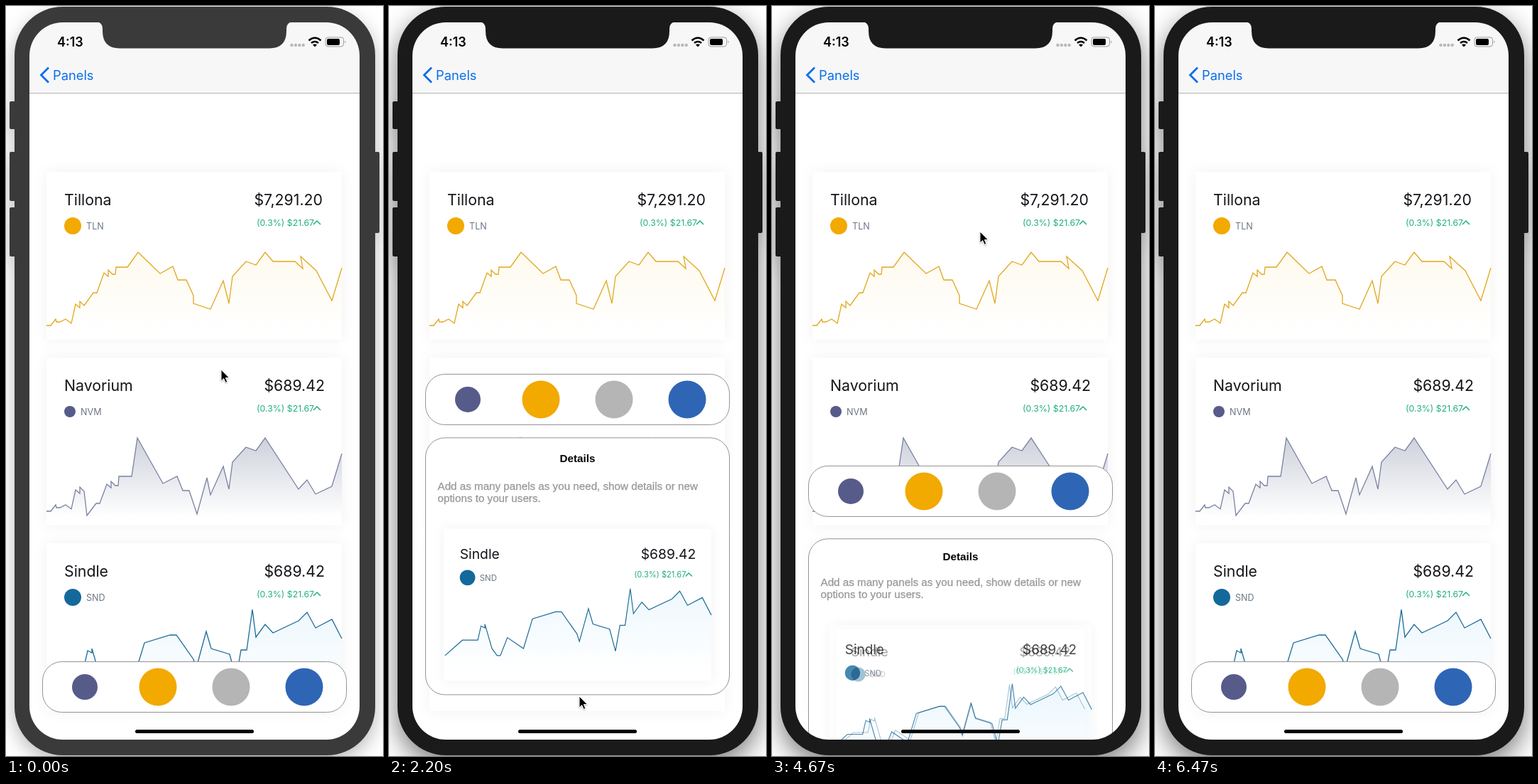
These frames come from a looping animation (531 px wide and 1054 px high, 6540 ms). An HTML page:

```html
<!DOCTYPE html>
<html lang="en">
<head>
<meta charset="utf-8">
<title>Panels</title>
<style>
html, body { margin: 0; width: 100%; height: 100%; overflow: hidden; background: #fff; }
svg { display: block; width: 531px; height: 1054px; }
svg { font-family: Inter, Roboto, sans-serif; }
.big { font-size: 21.3px; fill: #15151a; }
.tick { font-size: 12.6px; fill: #6c7886; }
.gain { font-size: 12.3px; fill: #20b07c; }
.card { fill: #fff; filter: drop-shadow(0 0 9px rgba(0,0,0,.055)); }
.sheet { fill: #fff; stroke: #939393; }
#head, #help { font-family: "Liberation Sans", Arial, sans-serif; font-size: 15.2px; }
#head { font-weight: 700; text-anchor: middle; }
#help { fill: #999; stroke: #999; stroke-width: .3; }
#ghost { mix-blend-mode: multiply; }
#phone { fill: #3a3a3a; filter: drop-shadow(0 9px 13px rgba(0,0,0,.27)); }
#phone.active { fill: #1a1a1a; filter: drop-shadow(0 13px 18px rgba(0,0,0,.52)); }
</style>
</head>
<body>
<svg viewBox="0 0 531 1054">
  <clipPath id="screen"><rect x="33" y="23" width="465" height="1008" rx="47"/></clipPath>
  <g id="phone">
    <rect x="12" y="1" width="508" height="1052" rx="68"/>
    <path d="M7 134h10v39H7q-2 0 -2 -2v-35q0 -2 2 -2zM7 205h10v69H7q-2 0 -2 -2v-65q0 -2 2 -2zM7 283h10v69H7q-2 0 -2 -2v-65q0 -2 2 -2z"/>
    <rect x="514" y="205" width="12" height="114" rx="2"/>
  </g>
  <g clip-path="url(#screen)">
    <path d="M0 0H531V1054H0z" fill="#fff"/>
    <g id="cards"></g>
    <path d="M33 22H498V122H33z" fill="#f7f7f7"/>
    <path d="M33 122.500H498" stroke="#b4b4b4"/>
    <g id="panel">
      <rect class="sheet" x="51.500" y=".5" width="428" height="361" rx="27"/>
      <text id="head" x="265.500" y="35">Details</text>
      <g id="help">
        <text x="68.500" y="74">Add as many panels as you need, show details or new</text>
        <text x="68.500" y="91">options to your users.</text>
      </g>
      <use id="mini" href="#c2"/>
      <use id="ghost" href="#c2"/>
    </g>
    <g id="bar">
      <rect class="sheet" x="51.500" y=".5" width="428" height="71" rx="27"/>
    </g>
    <rect x="182" y="1017" width="167" height="5" rx="2.500"/>
  </g>
  <path id="notch" d="M127 22Q136 23 136 32V35Q136 59.500 160 59.500H371Q395 59.500 395 35V32Q395 23 404 22z"/>
  <text x="72" y="57" font-size="18" font-weight="600">4:13</text>
  <path d="M402.500 55H420" stroke="#b9b9b9" stroke-width="4.400" stroke-linecap="round" stroke-dasharray="0 5.400"/>
  <g fill="none" stroke="#000" stroke-width="2.500">
    <path d="M426.500 48.500Q435 41 443.500 48.500M430 52Q435 48 440 52"/>
    <path d="M432 54.500Q435 52.500 438 54.500L435 57.500z" fill="#000" stroke="none"/>
  </g>
  <rect x="450" y="44" width="25.500" height="13" rx="3.500" fill="none" stroke="#999"/>
  <rect x="452" y="46" width="18" height="9" rx="2"/>
  <path d="M477.500 48.500q2 2 0 4z" fill="#888"/>
  <path d="M60 86.500L49.500 97L60 107.500" fill="none" stroke="#0a6fec" stroke-width="2.800"/>
  <text x="66" y="103.500" font-size="18.300" fill="#0a6fec">Panels</text>
  <path id="cursor" d="M0 0V16L3.700 12.600L6.200 18.300L8.800 17.200L6.400 11.600H11.400z" stroke="#fff" style="filter:drop-shadow(0 1px 1px rgba(0,0,0,.3))"/>
</svg>
<script>
const $ = id => document.getElementById(id);

// Charts are built from a few turning points and these shared pieces.
const jog = 'l6 5v-9l6 6';
const start = '0 216h6l7 -9 1 4h5l8 -4 8 6L41 186' + jog;
const middle = 'L231 193 249 153 257 185 262 147 281 126l14 5L308 113';
const end = 'L402 181 416 135';

const coins = [
  { name: 'Tillona', tick: 'TLN', price: '$7,291.20', right: 389, r: 12, icon: '#f2a900',
    line: '#e0a820', tint: '#f5c542', alpha: .09,
    chart: `${start}L66 170h5L81 142${jog}H97l1 -10h16L129 113 160 143 178 133 185 152h12L207 174v11${middle}l11 13h31l11 10L358 119 380 139${end}` },
  { name: 'Navorium', tick: 'NVM', price: '$689.42', right: 392, r: 8, icon: '#565b8a',
    line: '#7b80a2', tint: '#75809a', alpha: .36,
    chart: `${start}L57 222 70 205h5L85 178${jog}H101l1 -13h18L128 113 164 177 184 167 192 187h9L212 220 226 169${middle}L355 185 367 172 379 192${end}` },
  { name: 'Sindle', tick: 'SND', price: '$689.42', right: 392, r: 12, icon: '#14699b',
    line: '#1d6b97', tint: '#5bbcf0', alpha: .11,
    chart: `2 197L29 173h24L58 151l6 3v-6L75 186l8 11h5L99 169 124 186 138 140 174 129h9L207 163l4 12L225 124l7 24 26 8L267 190 274 150h8L290 93l5 39L308 114l11 12L355 109 367 97 379 119 402 107 416 134` }
];

function card(c, i) {
  const cx = 25 + c.r;
  return `<g transform="translate(57 ${233 + 261 * i})"><g id="c${i}">
    <linearGradient id="g${i}" x2="0" y2="1">
      <stop stop-color="${c.tint}" stop-opacity="${c.alpha}"/>
      <stop offset=".9" stop-color="${c.tint}" stop-opacity="0"/>
    </linearGradient>
    <rect class="card" width="416" height="236" rx="4"/>
    <path d="M${c.chart}V236H0z" fill="url(#g${i})"/>
    <path d="M${c.chart}" fill="none" stroke="${c.line}" stroke-width="1.3"/>
    <text class="big" x="25" y="46.500">${c.name}</text>
    <text class="big" x="${c.right}" y="46.500" text-anchor="end">${c.price}</text>
    <circle cx="${cx}" cy="76" r="${c.r}" fill="${c.icon}"/>
    <text class="tick" x="${cx + c.r + 7}" y="81">${c.tick}</text>
    <text class="gain" x="296" y="76">(0.3%) $21.67</text>
    <path d="M376 74l5 -5l5 5" fill="none" stroke="#20b07c" stroke-width="1.5"/>
  </g></g>`;
}
$('cards').innerHTML = coins.map(card).join('');
$('bar').innerHTML += ['#565b8a', '#f2a900', '#b5b5b5', '#2f65b5'].map((fill, i) =>
  `<circle cx="${111 + 103 * i}" cy="36" r="${i ? 26.5 : 18}" fill="${fill}"/>`).join('');

const LOOP = 6540, ACTIVE = 1530, OPEN = 1823, CLOSE = 4596;

// Pointer moves: begin, finish, then the place it heads for
const moves = [[70, 900, 268, 970], [3980, 4400, 293, 317], [5430, 5830, 500, 190]];

function pointer(t) {
  let x = 303, y = 511;
  for (const [begin, finish, tx, ty] of moves) {
    const f = Math.min(1, Math.max(0, (t - begin) / (finish - begin)));
    const e = f * f * (3 - 2 * f);
    x += (tx - x) * e;
    y += (ty - y) * e;
  }
  return [x, y];
}

// Step response of a spring with damping ratio 0.8
function spring(ms) {
  if (ms <= 0) return 0;
  const s = ms * .0139;
  return 1 - Math.exp(-.8 * s) * (Math.cos(.6 * s) + 4 / 3 * Math.sin(.6 * s));
}

const move = (id, x, y) => $(id).setAttribute('transform', `translate(${x} ${y})`);

function place(id, shift, scale, opacity) {
  const k = .906 * scale;
  $(id).setAttribute('transform',
    `translate(${265.5 - 208 * k} ${235 - shift - 118 * k}) scale(${k})`);
  $(id).setAttribute('opacity', opacity);
}

function draw(now) {
  const t = now % LOOP;
  const p = t < CLOSE ? 1 - spring(t - OPEN) : spring(t - CLOSE);
  const q = Math.min(1, Math.max(0, p));
  const active = t >= ACTIVE;

  $('phone').setAttribute('class', active ? 'active' : '');
  $('notch').setAttribute('fill', active ? '#1a1a1a' : '#3a3a3a');

  move('bar', 0, 523 + 398 * p);
  move('panel', 0, 613 + 438 * p);
  move('head', 0, -13 * q);
  move('help', 0, -22 * q);
  place('mini', 28 * q, 1 - .06 * q, 1 - .7 * q);
  place('ghost', 28 * q, 1 - .23 * q, Math.min(.4, 4 * q));

  move('cursor', ...pointer(t));
  $('cursor').setAttribute('visibility', t < moves[2][1] ? 'visible' : 'hidden');
  requestAnimationFrame(draw);
}
draw(0);
</script>
</body>
</html>
```
